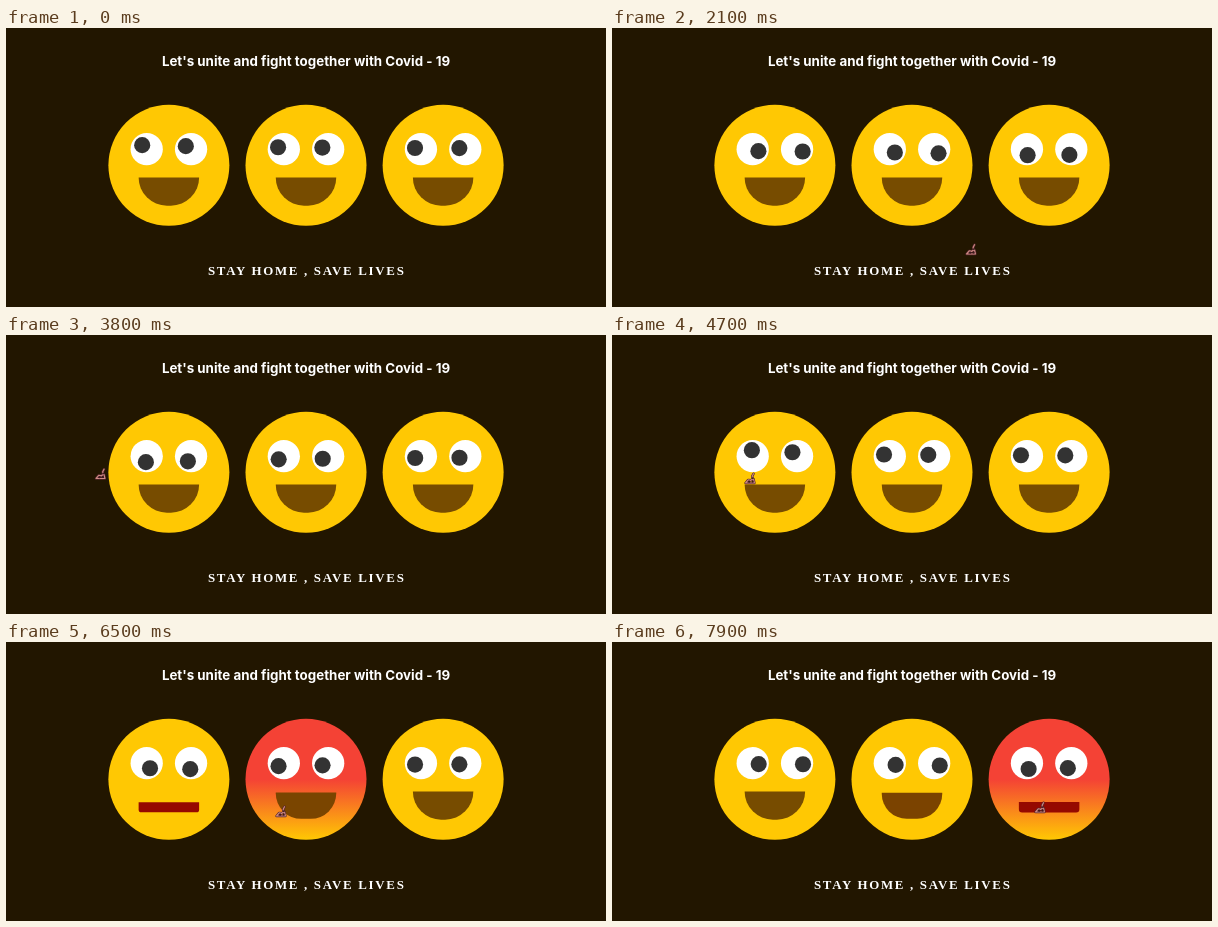
An HTML page for the animation above (8 s loop, 600x279 px).

```html
<!DOCTYPE html>
<html lang="en">
<head>
<meta charset="utf-8">
<title>Stay home</title>
<style>
  html, body { margin: 0; width: 100%; height: 100%; overflow: hidden; background: #221600; }
  svg { display: block; width: 600px; height: 279px; }
  text { fill: #fff; font-weight: 700; }
  .title { font-family: Inter, sans-serif; font-size: 13.35px; text-anchor: middle; }
  .motto { font-family: "Liberation Serif", serif; font-size: 12.9px; letter-spacing: 1.7px; }
  #pointer path { fill: none; stroke: #54262b; stroke-width: 2.8; stroke-linecap: round; stroke-linejoin: round; }
  #pointer .skin { stroke: #cf8a84; stroke-width: 1.3; }
  #pointer circle { fill: #3c1a20; }
</style>
</head>
<body>
<svg viewBox="0 0 600 279">
  <linearGradient id="angry" x2="0" y2="1">
    <stop offset=".5" stop-color="#f44235"/>
    <stop offset="1" stop-color="#ffc803"/>
  </linearGradient>
  <text class="title" x="300" y="38">Let's unite and fight together with Covid - 19</text>
  <text class="motto" x="202" y="247.4">STAY HOME , SAVE LIVES</text>
  <g id="faces"></g>
  <g id="pointer">
    <path d="M-5 4.5L-2 1L1 1.5L3 0L2.5 -3L4 -6M-5 4.5H5L4 0"/>
    <path class="skin" d="M-5 4.5L-2 1L1 1.5L3 0L2.5 -3L4 -6M-5 4.5H5L4 0"/>
    <circle cx="-1" cy="3" r="1.2"/>
    <circle cx="3" cy="-1" r="1.1"/>
    <circle cx="3" cy="3" r="1"/>
  </g>
</svg>
<script>
const LOOP = 8000, STEP = 100, LAG = 600;
const UNIT = 0.4033, FACE_Y = 137.3; // faces are drawn 300 units wide
const YELLOW = '#ffc803';

// Key points of the pointer: [time, x, y]. It is off stage until SHOWN.
const SHOWN = 500;
const path = [
  [400, 60, 49], [SHOWN, 559, 190], [900, 541, 205], [1500, 426, 221], [2100, 359, 222],
  [3000, 178, 222], [3500, 54, 200], [4100, 135, 79], [4700, 138, 144], [5100, 140, 178],
  [5700, 145, 180], [6500, 275, 170], [7100, 386, 165], [7300, 428, 166]
];
const touched = [4800, 6450, 7600, Infinity]; // each face stays angry until the next is touched

const lerp = (a, b, p) => a + (b - a) * p;
const mix = (a, b, p) => `rgb(${a.map((v, i) => Math.round(lerp(v, b[i], p)))})`;

function pointerAt(t) {
  const i = path.findIndex(key => key[0] > t);
  if (i === 0) return path[0].slice(1);
  if (i < 0) return path.at(-1).slice(1);
  const [t0, x0, y0] = path[i - 1], [t1, x1, y1] = path[i];
  const p = (t - t0) / (t1 - t0);
  return [lerp(x0, x1, p), lerp(y0, y1, p)];
}

// cubic-bezier(.25, .1, .25, 1)
function ease(x) {
  if (x <= 0) return 0;
  if (x >= 1) return 1;
  const curve = (s, a, b) => 3 * a * s * (1 - s) ** 2 + 3 * b * s * s * (1 - s) + s ** 3;
  let lo = 0, hi = 1;
  for (let i = 0; i < 20; i++) {
    const mid = (lo + hi) / 2;
    if (curve(mid, .25, .25) < x) lo = mid; else hi = mid;
  }
  return curve(lo, .1, 1);
}

function add(parent, tag, attrs) {
  const node = document.createElementNS('http://www.w3.org/2000/svg', tag);
  set(node, attrs);
  return parent.appendChild(node);
}

function set(node, attrs) {
  for (const name in attrs) node.setAttribute(name, attrs[name]);
}

function mouthShape(p) {
  const h = lerp(70, 20, p), r = lerp(70, 0, p);
  return `M-75 ${lerp(30, 60, p)}h150v${h - r}a${r} ${r} 0 0 1 ${-r} ${r}` +
    `h${2 * r - 150}a${r} ${r} 0 0 1 ${-r} ${-r}z`;
}

function makeFace(i) {
  const x = 300 + (i - 1) * 340 * UNIT;
  const group = add(document.getElementById('faces'), 'g',
    { transform: `translate(${x} ${FACE_Y}) scale(${UNIT})` });
  const skin = add(group, 'circle', { r: 150 });
  const mouth = add(group, 'path', {});
  const eyes = [-55, 55].map(cx => {
    add(group, 'circle', { cx, cy: -40, r: 40, fill: '#fff' });
    return { cx, pupil: add(group, 'circle', { r: 20, fill: '#333' }) };
  });

  return (t, gaze) => {
    const on = touched[i], off = touched[i + 1];
    const p = ease((t - on) / 500) - ease((t - off) / 500);
    set(skin, { fill: t >= on && t < off ? 'url(#angry)' : YELLOW });
    set(mouth, { d: mouthShape(p), fill: mix([119, 76, 0], [153, 0, 0], p) });
    for (const { cx, pupil } of eyes) {
      const angle = Math.atan2(gaze[1] - FACE_Y + 40 * UNIT, gaze[0] - x - cx * UNIT);
      set(pupil, { cx: cx + 15 * Math.cos(angle), cy: -40 + 15 * Math.sin(angle) });
    }
  };
}

const faces = [0, 1, 2].map(makeFace);
const pointer = document.getElementById('pointer');
const start = performance.now();

function tick() {
  const t = Math.floor((performance.now() - start) % LOOP / STEP) * STEP;
  const gaze = pointerAt(t - LAG);
  faces.forEach(update => update(t, gaze));
  set(pointer, {
    transform: `translate(${pointerAt(t)}) scale(.88)`,
    visibility: t < SHOWN ? 'hidden' : 'visible'
  });
  requestAnimationFrame(tick);
}
tick();
</script>
</body>
</html>
```
